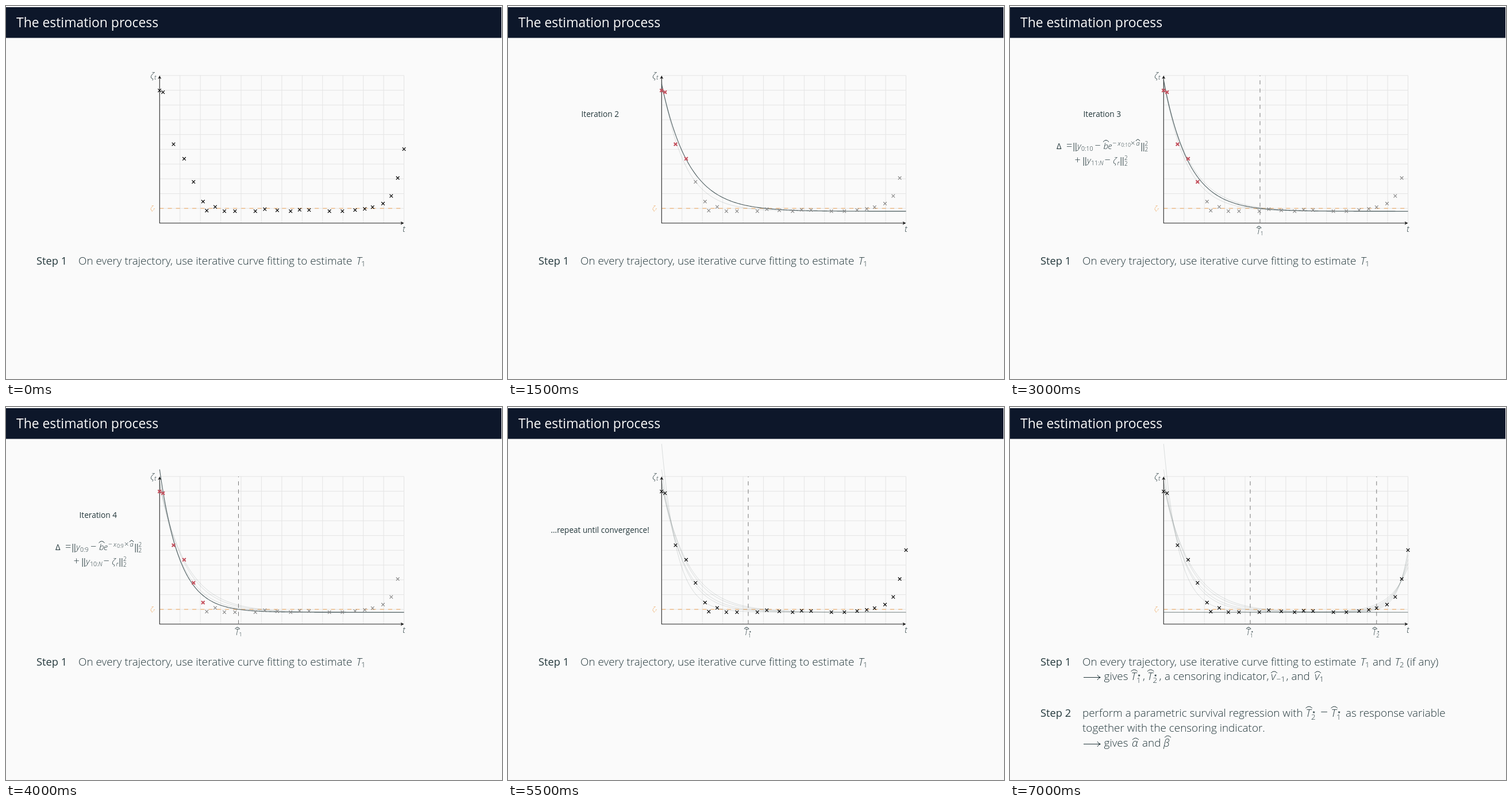
These frames come from a looping animation (863x649 px, 7500 ms). An HTML page:

```html
<!DOCTYPE html>
<html lang="en">
<head>
<meta charset="utf-8">
<title>The estimation process</title>
<style>
  html, body { margin: 0; width: 100%; height: 100%; overflow: hidden; background: #fafafa; }
  svg { display: block; width: 863px; height: 649px; }
  text { font-family: "Open Sans", "Noto Sans", sans-serif; font-weight: 300; fill: #23373b; }
  .it { font-style: italic; }
  .reg { font-weight: 400; }
  .title { fill: #fafafa; font-weight: 400; }
  .orange { fill: #eb9a48; }
  .star { font-family: "DejaVu Sans", sans-serif; font-weight: 400; }
  path { fill: none; stroke: #23373b; }
  .grid { stroke: #e4e4e4; }
  .axis { stroke: #2b2b2b; stroke-width: 1.1; }
  .tip { fill: #1c1c1c; stroke: none; }
  .level { stroke: #eda45a; stroke-dasharray: 7.1; }
  .guide { stroke: #777; stroke-dasharray: 7.1; }
  .past { opacity: .15; }
  .fit { opacity: .8; stroke-width: 1.1; }
  .mark { stroke: #000; stroke-width: 1.2; }
  .used { stroke: #c4505d; stroke-width: 2; }
  .unused { stroke: #858585; stroke-width: 1.1; }
</style>
</head>
<body>
<svg id="stage" viewBox="0 0 863 649" xmlns="http://www.w3.org/2000/svg"></svg>
<script>
const STEP = 500, STEPS = 15;
const left = 267.3, right = 692.5, top_ = 120.9, bottom = 377.8;
const base = 357.2, level = 352.1;

const points = [
  [267.2, 147], [273.2, 150], [291.5, 240.5], [310, 265.8], [326.3, 306], [342.8, 340.3],
  [349.3, 356], [364, 349.5], [380, 357], [398.4, 357], [433.8, 357], [450.3, 353.5],
  [472, 355.5], [495.2, 357], [510.8, 354.5], [527.3, 355], [562.7, 357], [585.3, 357],
  [607.4, 355], [624.2, 353], [637.8, 350], [656, 343.8], [670.3, 330.5], [681.6, 299.3], [692.5, 249]
];

// Each fit: height above the base line at its edge, and where it meets the level.
const fits = [
  { amp: 228, cut: 418, last: 9 },
  { amp: 221, cut: 447.5, last: 10 },
  { amp: 228, cut: 435, last: 10 },
  { amp: 248.5, cut: 404.5, last: 9 },
  { amp: 293, cut: 375, last: 7 }
];
const tailFits = [[108, 638], [100, 632], [92, 625], [85, 617], [78, 606]];

const path = (d, cls = "") => `<path class="${cls}" d="${d}"/>`;
const text = (x, y, size, str, cls = "") =>
  `<text x="${x}" y="${y}" font-size="${size}" class="${cls}">${str}</text>`;
const hat = (x, y, w) => path(`M${x} ${y}q${w / 2} -6 ${w} 0`);
const show = (from, to, body) => `<g data-from="${from}" data-to="${to}">${body}</g>`;

function curve(amp, cut, edge, cls) {
  const rate = Math.log(amp / (base - level)) / Math.abs(cut - edge);
  const pts = [];
  for (let i = 0; i <= 200; i++) {
    const x = left + (right - left) * i / 200;
    pts.push(x.toFixed(2) + " " + (base - amp * Math.exp(-rate * Math.abs(x - edge))).toFixed(2));
  }
  return path("M" + pts.join("L"), cls);
}

// T with a hat, an index and optionally a star
function estimate(x, y, s, n, star) {
  return text(x, y, s, "T", "it") + hat(x, y - .79 * s, .6 * s) +
    text(x + .5 * s, y + (star ? .28 : .12) * s, .7 * s, n) +
    (star ? text(x + .54 * s, y - .22 * s, .66 * s, "⋆", "star") : "");
}

const guide = x => path(`M${x} ${bottom}V${top_}`, "guide");
const arrow = y => path(`M128 ${y}h29m-5 -4.5q1.5 3.5 5.5 4.5q-4 1 -5.5 4.5`);

function norm(x, y) {
  return path(`M${x + 1.2} ${y - 11}v15m3.6 -15v15`);
}
const squared = (x, y) => text(x, y - 6, 10, "2") + text(x, y + 4, 10, "2");

function equation(last) {
  const a = last < 10 ? 5 : 0, b = a && -.5, c = a && -4;
  const y = 249, z = 274, rest = last + 1, d = a - (rest < 10 ? 6 : 0);
  return text(81 + a, y, 15, "Δ", "reg") + text(98 + a, y, 18, "=") + norm(110 + a, y) +
    text(117 + a, y, 15, "y", "it") + text(124 + a, y + 2.5, 10.5, "0:" + last) +
    text(147.5 + b, y, 18, "−") + text(162.5 + b, y, 15, "b", "it") + hat(162 + b, y - 12.5, 10) +
    text(170.5 + b, y, 15, "e", "it") + text(178.5 + b, y - 6.5, 12, "−") +
    text(187.5 + b, y - 6.5, 11, "x", "it") + text(193.5 + b, y - 4.5, 8.5, "0:" + last) +
    text(210 + c, y - 6.5, 13, "×") + text(219.5 + c, y - 6.5, 11, "a", "it") +
    hat(219 + c, y - 14, 7) + norm(228 + c, y) + squared(234.5 + c, y) +
    text(112.5 + a, z, 18, "+") + norm(127 + a, z) + text(134 + a, z, 15, "y", "it") +
    text(141 + a, z + 2.5, 10.5, `${rest}:<tspan class="it">N</tspan>`) +
    text(164.5 + d, z, 18, "−") + text(179 + d, z, 15, "ζ", "it") +
    text(186.5 + d, z + 2.5, 10.5, "r", "it") + norm(192 + d, z) + squared(199 + d, z);
}

function chart() {
  let grid = "";
  for (let i = 0; i <= 12; i++) grid += `M${left + (right - left) * i / 12} ${top_}V${bottom}`;
  for (let i = 0; i <= 10; i++) grid += `M${left} ${top_ + (bottom - top_) * i / 10}H${right}`;
  return path(grid, "grid") +
    path(`M${left} ${level}H${right}`, "level") +
    path(`M${left} ${top_ + 2}V${bottom}H${right - 2}`, "axis") +
    path(`M${left} ${top_}l3 6l-3 -1.6l-3 1.6z`, "tip") +
    path(`M${right} ${bottom}l-6 3l1.6 -3l-1.6 -3z`, "tip") +
    text(251, 126, 15, "ζ", "it") + text(258, 127.5, 11, "t", "it") +
    text(251, 355, 11, "ζ", "it orange") + text(256.3, 356, 7.5, "r", "it orange") +
    text(690, 392.5, 15, "t", "it");
}

function iterations() {
  return fits.map(({ amp, cut, last }, i) => {
    const from = 2 * i + 1;
    return show(from + 2, STEPS, curve(amp, cut, left, "past")) +
      show(from, from + 2, curve(amp, cut, left, "fit") + text(127.5, 193, 13.7, "Iteration " + (i + 1), "reg")) +
      show(from + 1, from + 2, guide(cut) + estimate(cut - 6, 397, 13.7, 1) + equation(last));
  }).join("");
}

function results() {
  return show(11, STEPS, guide(418) + estimate(411, 397, 13.7, 1, true)) +
    show(11, 12, text(74.5, 219, 13.6, "…repeat until convergence!", "reg")) +
    show(12, STEPS, tailFits.map(([amp, cut]) => curve(amp, cut, right, "past")).join("") +
      guide(637.8) + estimate(630.5, 397, 13.7, 2, true));
}

function notes() {
  const s = 18.9;
  return text(53, 449.5, 18.3, "Step 1", "reg") +
    text(126, 449.5, s, "On every trajectory, use iterative curve fitting to estimate") +
    text(609.5, 449.5, s, "T", "it") + text(618, 452.5, 13, "1") +
    show(12, STEPS, text(631, 449.5, s, "and") + text(669.5, 449.5, s, "T", "it") +
      text(678, 452.5, 13, "2") + text(690.5, 449.5, s, "(if any)")) +
    show(13, STEPS, arrow(470.5) + text(163.5, 475, s, "gives") +
      estimate(210.5, 475, s, 1, true) + text(231, 475, s, ",") +
      estimate(239, 475, s, 2, true) + text(259.5, 475, s, ",") +
      text(269, 475, s, "a censoring indicator,") +
      text(454, 475, s, "v", "it") + hat(454, 463, 11) + text(463.5, 478, 13.5, "−1") +
      text(480.5, 475, s, ", and") +
      text(530, 475, s, "v", "it") + hat(530, 463, 11) + text(538.5, 478, 13.5, "1")) +
    show(14, STEPS, text(53, 539, 18.3, "Step 2", "reg") +
      text(126, 539, s, "perform a parametric survival regression with") +
      estimate(514.5, 539, s, 2, true) + text(540, 539, 23, "−") +
      estimate(558.5, 539, s, 1, true) + text(584, 539, s, "as response variable") +
      text(126, 565, s, "together with the censoring indicator.") +
      arrow(586.5) + text(163.5, 591, s, "gives") +
      text(212, 591, s, "α", "it") + hat(213, 579, 11) + text(230, 591, s, "and") +
      text(267, 591, s, "β", "it") + hat(269, 575, 11));
}

const stage = document.getElementById("stage");
stage.innerHTML =
  `<rect y="2" width="862" height="53.5" fill="#0d172a"/>` +
  text(18, 37, 22.9, "The estimation process", "title") +
  chart() + iterations() + results() +
  points.map(([x, y]) => path(`M${x - 2.8} ${y - 2.8}l5.6 5.6m0 -5.6l-5.6 5.6`, "mark")).join("") +
  notes();

const parts = [...stage.querySelectorAll("[data-from]")];
const marks = [...stage.querySelectorAll(".mark")];

function draw(step) {
  for (const p of parts) {
    const on = step >= +p.dataset.from && step < +p.dataset.to;
    p.style.display = on ? "" : "none";
  }
  const fitting = step >= 1 && step <= 10;
  const used = Math.ceil(step / 2) + 2;
  marks.forEach((m, i) => {
    m.setAttribute("class", "mark" + (fitting ? (i < used ? " used" : " unused") : ""));
    m.style.display = fitting && i === marks.length - 1 ? "none" : "";
  });
}

let shown = -1;
function tick() {
  const step = Math.floor(performance.now() / STEP) % STEPS;
  if (step !== shown) draw(shown = step);
  requestAnimationFrame(tick);
}
tick();
</script>
</body>
</html>
```
